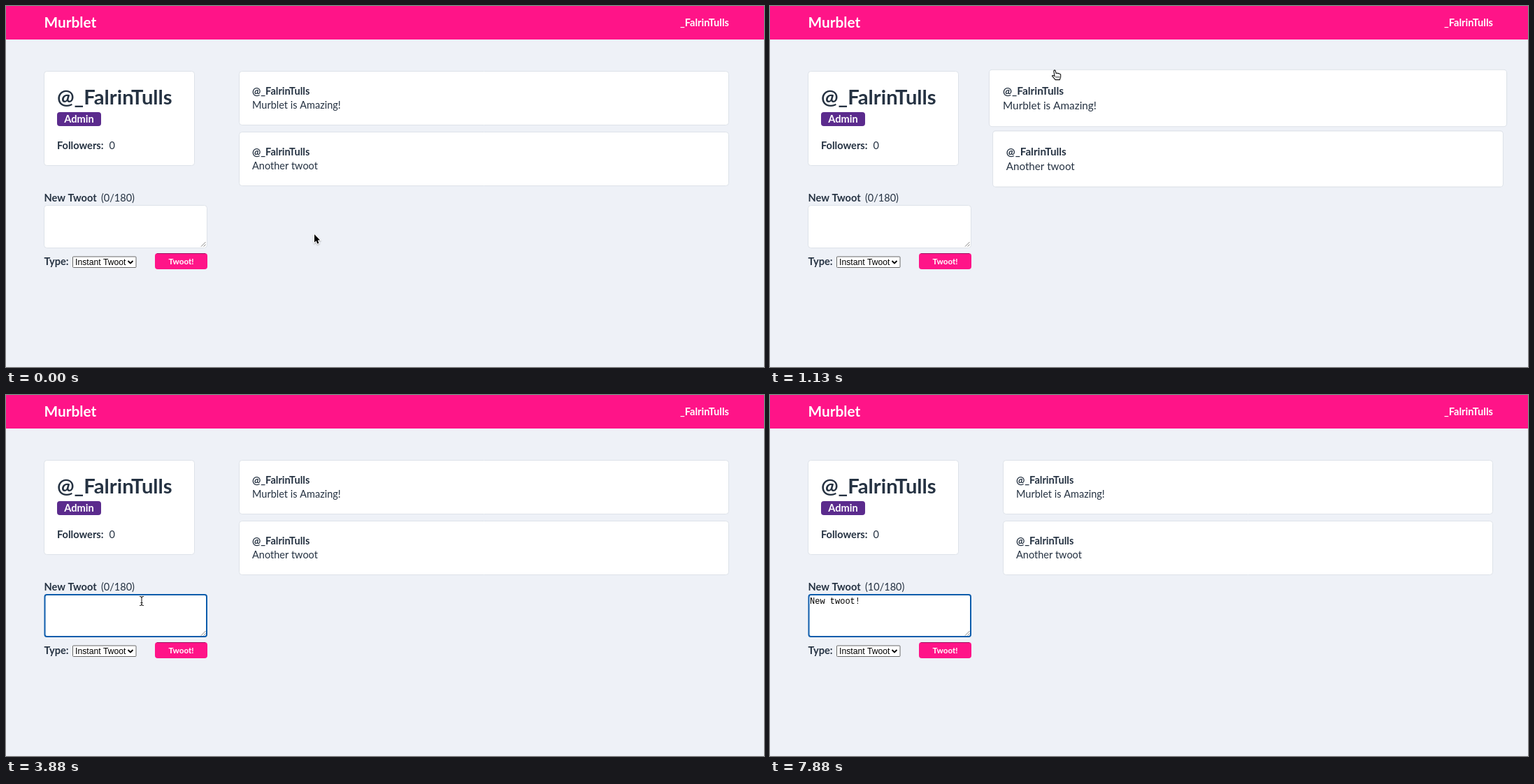
Write an HTML page with a canvas that moves like this. It is 1084 px wide and 517 px high and loops after 8000 ms.

```html
<!DOCTYPE html>
<html lang="en">
<head>
<meta charset="utf-8">
<title>Murblet</title>
<style>
  html, body { margin: 0; width: 100%; height: 100%; overflow: hidden; background: #eef1f7; }
  canvas { display: block; width: 1084px; height: 517px; }
</style>
</head>
<body>
<canvas id="stage" width="1084" height="517"></canvas>
<script>
const canvas = document.getElementById('stage');
const ctx = canvas.getContext('2d');
const ratio = window.devicePixelRatio || 1;
canvas.width = 1084 * ratio;
canvas.height = 517 * ratio;

const LOOP = 8000, STEP = 125;
const PINK = '#ff1488', INK = '#253242', PAGE = '#eef1f7', EDGE = '#dde2e9';
const LATO = 'Lato, "Open Sans", sans-serif';
const BODY = `14.5px ${LATO}`, BOLD = `bold 14.6px ${LATO}`;
const USER = '_FalrinTulls', BRAND = 'Murblet';

const FOCUS = 3375;
const MESSAGE = 'New twoot!';
const KEYS = [4750, 5125, 5500, 5625, 5875, 6000, 6125, 6375, 6750, 7375];

// Each hover entry is [time, target], eased over HOVER_TIME.
const HOVER_TIME = 250;
const CARDS = [
  { y: 93.5, text: `${BRAND} is Amazing!`, hover: [[467, 1], [720, 0], [1042, 1], [1300, 0]] },
  { y: 180.5, text: 'Another twoot', hover: [[407, 1], [467, 0], [735, 1], [1042, 0]] }
];

// Pointer path: [time, x, y, shape]
const PATH = [
  [0, 441, 327, arrow], [250, 443, 302, arrow], [375, 445, 262, arrow],
  [407, 445, 240, hand], [500, 447, 149, hand], [625, 447, 128, hand],
  [750, 440, 192, hand], [875, 432, 228, hand], [1000, 421, 188, hand],
  [1125, 409, 92, hand], [1250, 370, 108, hand], [1300, 332, 130, arrow],
  [1500, 232, 228, arrow], [1625, 196, 273, arrow],
  [1750, 195, 287, beam], [1875, 194, 295, beam]
];

// CSS "ease": cubic-bezier(.25, .1, .25, 1)
function ease(x) {
  if (x <= 0) return 0;
  if (x >= 1) return 1;
  const bez = (a, b, s) => 3 * a * s * (1 - s) ** 2 + 3 * b * s * s * (1 - s) + s ** 3;
  let lo = 0, hi = 1;
  for (let i = 0; i < 24; i++) {
    const mid = (lo + hi) / 2;
    if (bez(0.25, 0.25, mid) < x) lo = mid; else hi = mid;
  }
  return bez(0.1, 1, lo);
}

function hoverAt(events, t) {
  let from = 0, to = 0, start = -HOVER_TIME;
  const value = now => from + (to - from) * ease((now - start) / HOVER_TIME);
  for (const [time, target] of events) {
    if (time > t) break;
    from = value(time);
    to = target;
    start = time;
  }
  return value(t);
}

function text(str, x, y, font = BODY, color = INK, align = 'left') {
  ctx.font = font;
  ctx.fillStyle = color;
  ctx.textAlign = align;
  ctx.fillText(str, x, y);
}

function box(x, y, w, h, r, fill, stroke, line = 1) {
  ctx.beginPath();
  ctx.roundRect(x, y, w, h, r);
  ctx.fillStyle = fill;
  ctx.fill();
  if (stroke) {
    ctx.strokeStyle = stroke;
    ctx.lineWidth = line;
    ctx.stroke();
  }
}

function trace(points, color, width) {
  ctx.beginPath();
  points.forEach(([x, y], i) => i ? ctx.lineTo(x, y) : ctx.moveTo(x, y));
  ctx.strokeStyle = color;
  ctx.lineWidth = width;
  ctx.stroke();
}

function arrow() {
  ctx.shadowColor = 'rgba(0,0,0,.3)';
  ctx.shadowBlur = 2 * ratio;
  ctx.shadowOffsetY = ratio;
  const tip = [[0, 0], [0, 11.5], [2.6, 9.2], [4.5, 13.4], [6.4, 12.6], [4.7, 8.5], [8, 8.2]];
  trace([...tip, [0, 0]], '#fff', 2);
  ctx.shadowColor = 'transparent';
  ctx.fillStyle = '#000';
  ctx.fill();
}

function hand() {
  ctx.beginPath();
  ctx.moveTo(-2, 8.5);
  ctx.lineTo(-3.2, 1);
  ctx.quadraticCurveTo(-2.2, -1, -0.9, 0.6);
  ctx.lineTo(0.2, 4.6);
  ctx.quadraticCurveTo(1.8, 3.4, 2.7, 4.8);
  ctx.quadraticCurveTo(4.2, 3.8, 4.9, 5.3);
  ctx.quadraticCurveTo(6.4, 4.8, 6.7, 6.5);
  ctx.quadraticCurveTo(7.2, 9.5, 5.4, 13.6);
  ctx.lineTo(-1, 13.6);
  ctx.quadraticCurveTo(-3, 11, -5.5, 8.4);
  ctx.quadraticCurveTo(-5, 6.4, -2, 8.5);
  ctx.closePath();
  ctx.fillStyle = '#fff';
  ctx.fill();
  ctx.strokeStyle = '#111';
  ctx.lineWidth = 1.1;
  ctx.stroke();
  for (const x of [0.2, 2.3, 4.4]) trace([[x, 8.4], [x, 11.4]], '#222', 0.8);
}

function beam() {
  const hook = end => [[-3, end * 6.5], [-1, end * 6.2], [0, end * 5], [1, end * 6.2], [3, end * 6.5]];
  const strokes = [hook(-1), hook(1), [[0, -5], [0, 5]], [[-1.6, 2.5], [1.6, 2.5]]];
  for (const s of strokes) trace(s, '#fff', 2.4);
  for (const s of strokes) trace(s, '#222', 1.1);
}

function drawPointer(t) {
  if (t >= KEYS[0]) return;
  let i = 0;
  while (i < PATH.length - 1 && PATH[i + 1][0] <= t) i++;
  const a = PATH[i], b = PATH[i + 1] || a;
  const k = b === a ? 0 : (t - a[0]) / (b[0] - a[0]);
  ctx.save();
  ctx.translate(a[1] + (b[1] - a[1]) * k, a[2] + (b[2] - a[2]) * k);
  a[3]();
  ctx.restore();
}

function drawCard(card, t) {
  const scale = 1 + 0.1 * hoverAt(card.hover, t);
  const cx = 683.5, cy = card.y + 38.5;
  ctx.save();
  ctx.translate(cx, cy);
  ctx.scale(scale, scale);
  ctx.translate(-cx, -cy);
  box(333.5, card.y, 700, 77, 4, '#fff', EDGE);
  text('@' + USER, 352, card.y + 33.5, BOLD);
  text(card.text, 352, card.y + 53.5);
  ctx.restore();
}

function drawProfile() {
  box(54.5, 93.5, 215, 135, 4, '#fff', EDGE);
  text('@' + USER, 73, 141, `bold 29.2px ${LATO}`);
  box(73, 152, 63, 20, 4, '#5b2b8d');
  text('Admin', 104.5, 167, BOLD, '#fff', 'center');
  text('Followers:', 73, 205, BOLD);
  text('0', 147.5, 205);
}

function drawForm(t) {
  const typed = KEYS.filter(k => k <= t);
  const count = typed.length;
  text('New Twoot', 54.5, 280, BOLD);
  text(`(${count}/180)`, 136, 280);

  const focused = t >= FOCUS;
  if (focused) box(55.5, 286, 231.5, 60, 3, '#fff', '#0d5cab', 2);
  else box(54.5, 285.5, 233, 61, 4, '#fff', EDGE);
  trace([[279, 344.5], [285.5, 338]], '#777', 0.9);
  trace([[282.5, 344.5], [285.5, 341.5]], '#777', 0.9);

  text(MESSAGE.slice(0, count), 57, 298.5, '12px "Liberation Mono", monospace', '#000');
  const since = t - (count ? typed[count - 1] : FOCUS);
  if (focused && since % 1000 < 500) {
    ctx.fillStyle = '#000';
    ctx.fillRect(Math.round(57 + 7.2 * count), 288, 1, 13);
  }

  text('Type:', 54.5, 371, BOLD);
  box(95.5, 359, 90.5, 15.5, 1, '#fff', '#686868');
  text('Instant Twoot', 99, 371, '12.2px "Liberation Sans", sans-serif', '#000');
  trace([[174.5, 365], [178, 368.5], [181.5, 365]], '#000', 1.8);

  box(213, 354, 75, 23, 4, PINK);
  trace([[216, 354.5], [285, 354.5]], 'rgba(90,20,70,.6)', 1);
  text('Twoot!', 250.5, 370, `bold 11.7px ${LATO}`, '#fff', 'center');
}

function draw(t) {
  ctx.setTransform(ratio, 0, 0, ratio, 0, 0);
  ctx.fillStyle = PAGE;
  ctx.fillRect(0, 0, 1084, 517);
  ctx.fillStyle = PINK;
  ctx.fillRect(0, 0, 1084, 48);
  text(BRAND, 54.5, 30.5, `bold 20.8px ${LATO}`, '#fff');
  text(USER, 1034, 29, BOLD, '#fff', 'right');
  drawProfile();
  drawForm(t);
  CARDS.forEach(card => drawCard(card, t));
  drawPointer(t);
}

const begin = performance.now();
function frame() {
  const t = (performance.now() - begin) % LOOP;
  draw(Math.floor(t / STEP) * STEP);
  requestAnimationFrame(frame);
}
frame();
</script>
</body>
</html>
```
